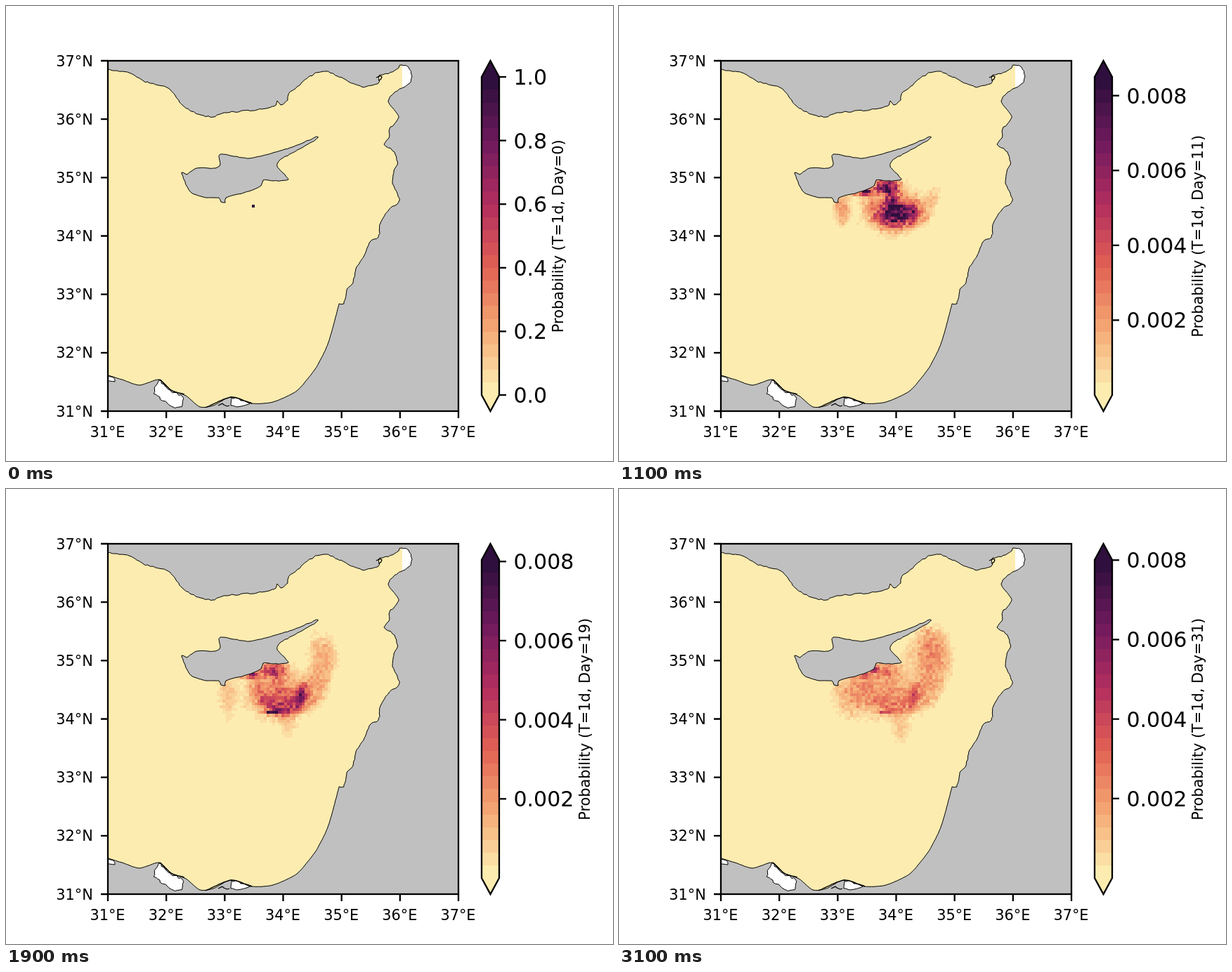
These frames come from a looping animation (864x648 px, 3200 ms). An HTML page:

```html
<!DOCTYPE html>
<html lang="en">
<head>
<meta charset="utf-8">
<title>Drift probability</title>
<style>
html, body { margin: 0; width: 100%; height: 100%; overflow: hidden; background: #fff; }
svg { display: block; width: 864px; height: 648px; font-family: "DejaVu Sans", sans-serif; font-size: 20.83px; }
.frame { fill: none; stroke: #000; stroke-width: 2.3; }
.coast { stroke: #000; stroke-width: 1; stroke-linejoin: round; }
.ink { fill: none; stroke: #000; stroke-width: 1.3; stroke-linejoin: round; }
#ticks text { font-size: 30px; }
#cells, #blocks { shape-rendering: crispEdges; }
</style>
</head>
<body>
<svg viewBox="0 0 864 648">
  <defs>
    <clipPath id="box"><rect x="145" y="78" width="499" height="499"/></clipPath>
    <clipPath id="water"><use href="#sea"/></clipPath>
  </defs>
  <rect width="864" height="648" fill="#fff"/>
  <g clip-path="url(#box)">
    <rect x="145" y="78" width="499" height="499" fill="#c0c0c0"/>
    <path id="sea" fill="#fdecb0"/>
    <g clip-path="url(#water)">
      <rect x="564" y="80" width="20" height="40" fill="#fff"/>
      <g id="cells"></g>
    </g>
    <use href="#sea" class="coast" style="fill-opacity:0"/>
    <path id="island" class="coast" fill="#c0c0c0"/>
    <path id="lagoons" class="coast" fill="#fff"/>
    <path id="spits" class="ink"/>
  </g>
  <g id="axes"><rect class="frame" x="145" y="78" width="499" height="499"/></g>
  <g id="blocks"></g>
  <path class="frame" d="M677,101L689.5,78 702,101V554L689.5,577 677,554Z"/>
  <g id="ticks"></g>
  <text id="title" text-anchor="middle"></text>
</svg>
<script>
const LEVELS = 25, CELL = 4.16, BAR_TOP = 101, BAR_BOTTOM = 554;
const $ = id => document.getElementById(id);
const mix = (a, b, k) => a + (b - a) * k;
const clamp = v => Math.min(1, Math.max(0, v));
const hash = (i, j) => { const s = Math.sin(i * 12.9898 + j * 78.233) * 43758.5453; return s - Math.floor(s); };

// Smooth curve through key points, roughened by seeded noise
function shoreline(keys, rough, closed) {
  const pts = keys.split(" ").map(p => p.split(",").map(Number)), n = pts.length;
  const at = i => pts[closed ? (i + n) % n : Math.min(n - 1, Math.max(0, i))];
  const out = [];
  for (let i = 0; i < (closed ? n : n - 1); i++) {
    const [a, b, c, d] = [at(i - 1), at(i), at(i + 1), at(i + 2)];
    const steps = Math.max(2, Math.round(Math.hypot(c[0] - b[0], c[1] - b[1]) / 3.5));
    for (let s = 0; s < steps; s++) {
      const t = s / steps, h = t * t * (3 - 2 * t);
      out.push([0, 1].map(k => {
        const bend = .35 * ((c[k] - a[k]) * t * (1 - t) ** 2 - (d[k] - b[k]) * t * t * (1 - t));
        const jag = s ? rough * (hash(out.length + 9, k + i) - .5) : 0;
        return (mix(b[k], c[k], h) + bend + jag).toFixed(1);
      }));
    }
  }
  if (!closed) out.push(at(n - 1));
  return out.join(" ");
}

function drawCoasts() {
  const north = shoreline("145,91 175,95 196,107 231,117 251,141 264,150 281,156 295,158 310,152 357,148 381,143 386,135 391,141 401,134 402,126 420,110 438,97 456,93 472,100 506,115 530,110 531,99 550,94 563,84 573,87 578,100 573,111 554,122", 1.8);
  const east = shoreline("554,122 544,135 559,159 546,175 545,188 538,197 553,208 557,226 552,235 550,251 560,277 545,290 533,309 530,329 518,336 510,355 498,374 494,394 485,404 481,424 474,424", 1.6);
  const south = shoreline("474,424 463,466 455,489 440,517 414,548 380,564 350,566 320,557 295,569 276,571 256,555 235,547 218,532 190,540 165,532 145,526", .3);
  $("sea").setAttribute("d", `M${north} ${east} ${south}Z`);
  $("island").setAttribute("d", `M${shoreline("250,237 257,240 271,231 298,231 305,225 305,211 346,217 380,209 410,200 443,186 440,191 410,208 390,219 386,229 402,247 381,249 366,248 363,256 345,264 313,273 312,280 306,279 303,273 285,273 264,266 257,256", .8, true)}Z`);
  const lagoons = [
    shoreline("218,533 213,541 210,552 219,557 229,565 238,571 251,568 251,556 235,549", 4, true),
    shoreline("321,558 320,569 335,570 350,566 337,562", 3, true),
    shoreline("143,528 153,529 155,535 143,533", 1, true)
  ];
  $("lagoons").setAttribute("d", lagoons.map(l => `M${l}Z`).join(""));
  const spits = [
    shoreline("219,532 235,547 254,553", .5), shoreline("284,572 320,557 350,566", .5),
    shoreline("302,569 310,568 318,569", 5), shoreline("527,102 535,101 530,106", 4)
  ];
  $("spits").setAttribute("d", spits.map(s => `M${s}`).join(""));
}

const stops = [[253,236,176], [245,167,115], [225,97,84], [179,46,94], [113,26,94], [47,15,61]];
function shade(level) {
  const p = level / (LEVELS - 1) * (stops.length - 1), i = Math.min(p | 0, stops.length - 2);
  return `rgb(${stops[i].map((c, n) => Math.round(mix(c, stops[i + 1][n], p - i)))})`;
}

// The release drifts east, turns into a crescent, sends an arm north and thins out
function plumeOn(day) {
  const ramp = (a, b) => { const t = clamp((day - a) / (b - a)); return t * t * (3 - 2 * t); };
  const fade = (from, half) => .5 ** (Math.max(0, day - from) / half);
  const drift = clamp(day / 7), turn = ramp(7, 14);
  const parts = [];
  const spot = (cx, cy, rx, ry, power) => {
    if (power > 0) parts.push((x, y, jx, jy) =>
      power * Math.exp(-((((x - cx) / rx + jx) ** 2 + ((y - cy) / ry + jy) ** 2) ** 1.5)));
  };
  const coreX = 352.1 + 36 * drift + 11 * turn, coreY = 285.1 - 5 * drift + 22 * turn;
  const coreRx = 1.5 + 12 * drift + 14 * turn, coreRy = 1.5 + 13 * drift + 2 * turn;
  spot(coreX, coreY, coreRx, coreRy, mix(1, .55, drift) * mix(1, .1, ramp(13, 21)));
  spot(coreX, coreY, coreRx * 1.8, coreRy * 1.6, .25 * drift * fade(10, 5));
  spot(389, 277, 11, 16, .4 * ramp(5, 8) * fade(9, 4));
  spot(381, 257, 18, 11, .7 * ramp(4, 11) * fade(11, 11));

  // Shore and western tail
  spot(348, 267, 16, 5, .45 * ramp(3, 7) * fade(8, 14));
  spot(352, 263, 6, 3.5, .65 * ramp(6, 11) * fade(12, 8));
  spot(363, 256, 5, 5, .65 * ramp(17, 25));
  spot(mix(321, 316, turn) + 12 * ramp(19, 31), 279 + 14 * turn, 9 + 4 * turn + 8 * ramp(19, 31), 10 + 22 * turn,
    .23 * ramp(3, 7) * mix(1, .5, ramp(14, 20)));

  // Spreading haze, southern pile-up and tail
  spot(385 - 10 * ramp(14, 31), 288, 36 + 16 * ramp(14, 31), 35, .24 * ramp(6, 14));
  spot(421, 291, 7, 14, .35 * ramp(8, 14) * fade(15, 9));
  const pile = ramp(14, 19) * mix(1, .45, ramp(24, 31));
  spot(381, 318.4, 12, 3, .55 * pile);
  spot(394, 318.4, 26, 4, .22 * pile);
  spot(402, 326 + day * .5, 13, 20, .12 * ramp(13, 22));

  const crescent = .32 * ramp(8, 14) * fade(15, 9);
  parts.push((x, y) => {
    const dx = (x - 392) * 1.1, dy = y - 279, angle = Math.atan2(dx, dy);
    return crescent * Math.exp(-(((Math.hypot(dx, dy) - 35) / 9) ** 2) - (angle / 1.7) ** 4);
  });
  const tip = 190 + 70 * Math.exp(-(day - 11) / 7), middle = (tip + 312) / 2;
  const arm = .19 * ramp(7, 14), width = 11 + 11 * ramp(10, 24);
  parts.push((x, y, jx, jy) => {
    const across = (x - 451 + ((y - 238) / 14) ** 2) / width + jx, along = (y - middle) / (312 - middle) + jy;
    return arm * Math.exp(-(across ** 4) - along ** 6);
  });
  spot(432, 236, 26, 26, .13 * ramp(23, 31));
  return parts;
}

function drawPlume(day) {
  const parts = plumeOn(day), paths = Array(LEVELS).fill("");
  for (let j = -22; j < 22; j++) for (let i = -14; i < 34; i++) {
    const x = 350 + i * CELL, y = 283 + j * CELL;
    const [grain, jx, jy] = [40, 140, 240].map(seed => hash(i + seed, j + seed) - .5);
    let v = 0;
    for (const part of parts) v += part(x + CELL / 2, y + CELL / 2, jx * .3, jy * .3);
    if (day) v *= 1 + .65 * grain;
    const level = Math.min(LEVELS - 1, Math.floor(v * LEVELS));
    if (level > 0) paths[level] += `M${x.toFixed(2)},${y.toFixed(2)}h${CELL}v${CELL}h-${CELL}z`;
  }
  paths.forEach((d, n) => $("cells").children[n].setAttribute("d", d));
}

// Highest probability: power law between a few key days
const peaks = [[0, 1], [7, .02063], [11, .0085], [14, .00649], [16, .0063], [19, .00804], [24, .00707], [31, .008005]];
function peakOn(day) {
  let k = 0;
  while (day > peaks[k + 1][0]) k++;
  const [[d0, v0], [d1, v1]] = [peaks[k], peaks[k + 1]];
  return v0 * (v1 / v0) ** (Math.log((1 + day) / (1 + d0)) / Math.log((1 + d1) / (1 + d0)));
}

function drawScale(day) {
  const top = peakOn(day), unit = 10 ** Math.floor(Math.log10(top) - 1);
  const step = [1, 2, 2.5, 5, 10, 20, 25, 50].map(m => m * unit).find(s => top / s <= 7.0001);
  const digits = [1, 2, 3, 4, 5].find(n => Math.abs(step * 10 ** n - Math.round(step * 10 ** n)) < 1e-6);
  let out = "";
  for (let n = day ? 1 : 0; n * step <= top * 1.0001; n++) {
    const y = BAR_BOTTOM - n * step / top * (BAR_BOTTOM - BAR_TOP);
    out += `<path class="frame" d="M702,${y}h10"/><text x="722.5" y="${y + 11}">${(n * step).toFixed(digits)}</text>`;
  }
  $("ticks").innerHTML = out;
  $("title").textContent = `Probability (T=1d, Day=${day})`;
  $("title").setAttribute("transform", `translate(${792.5 + (digits - 1) * 19.08} 327.8) rotate(-90)`);
}

function drawFixed() {
  drawCoasts();
  let axes = "";
  for (let n = 0; n < 7; n++) {
    const x = 145 + n * 499 / 6, y = 577 - n * 499 / 6;
    axes += `<path class="frame" d="M${x},577v10M145,${y}h-10"/>
      <text x="${x - .5}" y="613.5" text-anchor="middle">${31 + n}°E</text>
      <text x="123.8" y="${y + 7.5}" text-anchor="end">${31 + n}°N</text>`;
  }
  $("axes").innerHTML += axes;
  const height = (BAR_BOTTOM - BAR_TOP) / LEVELS;
  let cells = "", blocks = `<path fill="${shade(LEVELS - 1)}" d="M677,101.5L689.5,78 702,101.5z"/>
    <path fill="${shade(0)}" d="M677,553.5L689.5,577 702,553.5z"/>`;
  for (let n = 0; n < LEVELS; n++) {
    blocks += `<rect x="677" y="${BAR_BOTTOM - (n + 1) * height}" width="25" height="${height + .3}" fill="${shade(n)}"/>`;
    cells += `<path fill="${shade(n)}"/>`;
  }
  $("blocks").innerHTML = blocks;
  $("cells").innerHTML = cells;
}

let shown = -1;
const start = performance.now();
function tick(now) {
  const day = Math.floor(Math.max(0, now - start) % 3200 / 100);
  if (day !== shown) {
    shown = day;
    drawPlume(day);
    drawScale(day);
  }
  requestAnimationFrame(tick);
}
drawFixed();
tick(start);
</script>
</body>
</html>
```
